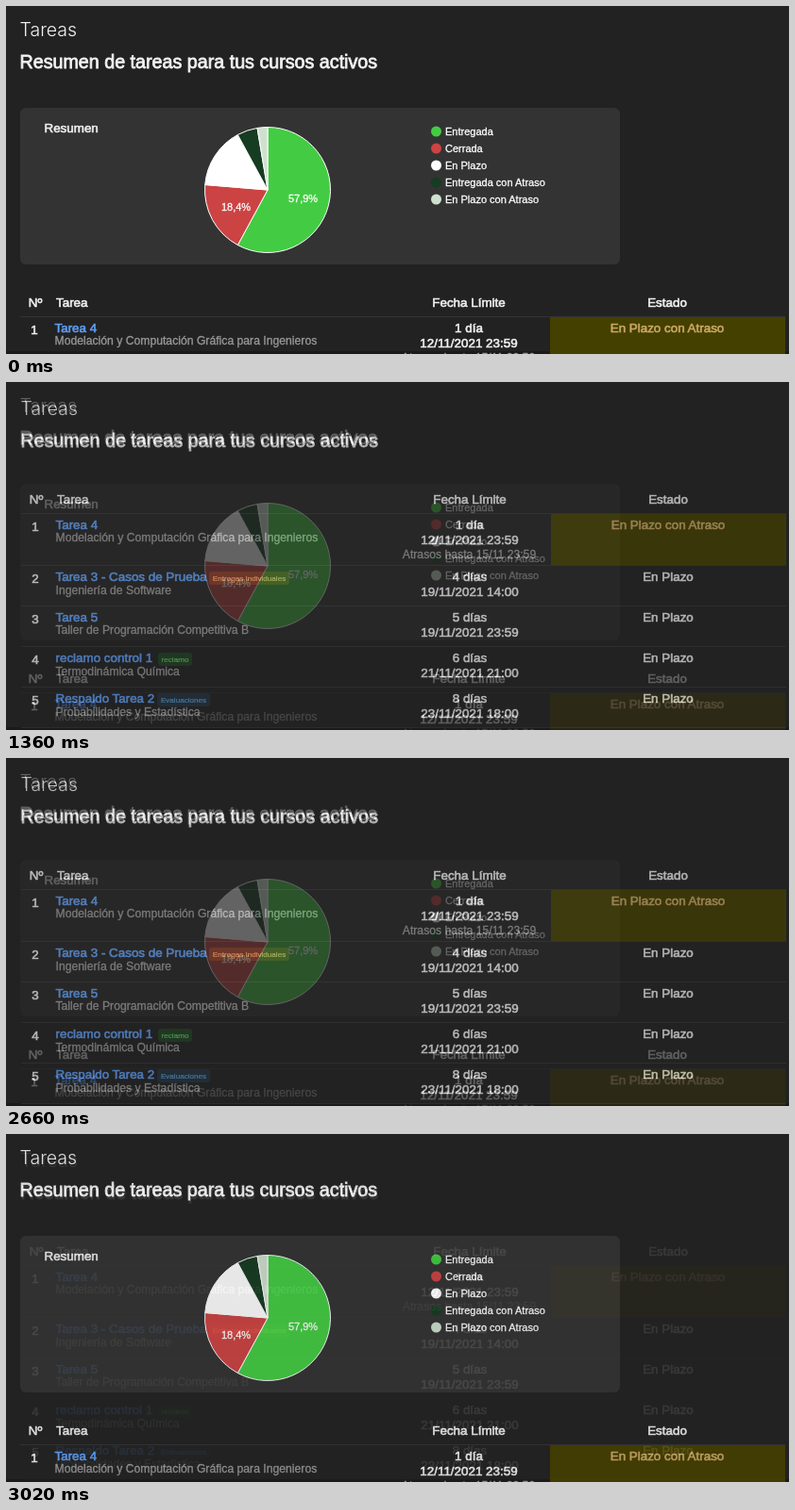
Animation of 829x369 px, one loop 3080 ms. Source, as an HTML page:

```html
<!DOCTYPE html>
<html lang="es">
<head>
<meta charset="utf-8">
<title>Tareas</title>
<style>
  html, body { margin: 0; width: 100%; height: 100%; overflow: hidden; background: #222; }
  svg { display: block; }
  /* A thin outline in the text colour gives the medium weight. */
  text {
    font-family: "Liberation Sans", Arial, sans-serif;
    color: #f2f2f2; fill: currentColor; stroke: currentColor; stroke-width: 0;
  }
  .title { font: 300 19.5px Inter, sans-serif; }
  .heading { font-size: 19.7px; stroke-width: .8px; }
  .strong { font-size: 13.4px; stroke-width: .6px; }
  .link { color: #5f9ff8; }
  .late { color: #cda865; }
  .sub { font-size: 12.2px; color: #999; stroke-width: .3px; }
  .badge { font-size: 8.1px; stroke-width: .2px; }
  .chart { font-size: 11px; color: #fff; stroke-width: .3px; }
  .mid { text-anchor: middle; }
</style>
</head>
<body>
<svg id="stage" width="829" height="369" viewBox="0 0 829 369"></svg>
<script>
const rows = [
  { y: 329, n: 1, task: "Tarea 4", course: "Modelación y Computación Gráfica para Ingenieros",
    left: "1 día", due: "12/11/2021 23:59", late: "Atrasos hasta 15/11 23:59" },
  { y: 384, n: 2, task: "Tarea 3 - Casos de Prueba", course: "Ingeniería de Software",
    left: "4 días", due: "19/11/2021 14:00",
    badge: { text: "Entregas Individuales", x: 214, w: 85, bg: "#44341f", fg: "#d6a568" } },
  { y: 427, n: 3, task: "Tarea 5", course: "Taller de Programación Competitiva B",
    left: "5 días", due: "19/11/2021 23:59" },
  { y: 470, n: 4, task: "reclamo control 1", course: "Termodinámica Química",
    left: "6 días", due: "21/11/2021 21:00",
    badge: { text: "reclamo", x: 160, w: 36, bg: "#213f24", fg: "#5fc464" } },
  { y: 513, n: 5, task: "Respaldo Tarea 2", course: "Probabilidades y Estadística",
    left: "8 días", due: "23/11/2021 18:00",
    badge: { text: "Evaluaciones", x: 159, w: 56, bg: "#23323f", fg: "#5a9bd0" } },
];
const slices = [
  ["Entregada", 22, "#43cc43"],
  ["Cerrada", 7, "#cc4343"],
  ["En Plazo", 6, "#ffffff"],
  ["Entregada con Atraso", 2, "#163c22"],
  ["En Plazo con Atraso", 1, "#cfe0cf"],
];

const text = (x, y, cls, s, attrs = "") => `<text x="${x}" y="${y}" class="${cls}" ${attrs}>${s}</text>`;
const rect = (x, y, w, h, fill, rx = 0) =>
  `<rect x="${x}" y="${y}" width="${w}" height="${h}" fill="${fill}" rx="${rx}"/>`;
const shift = (x, y, body) => `<g transform="translate(${x} ${y})">${body}</g>`;

const headings = text(14.5, 32, "title", "Tareas") +
  text(14.5, 66, "heading", "Resumen de tareas para tus cursos activos");

function badge({ text: label, x, w, bg, fg }, y) {
  return rect(x, y + 7, w, 14, bg, 3) +
    text(x + w / 2, y + 16.5, "badge mid", label, `style="color:${fg}"`);
}

function row(r) {
  const { y } = r;
  return (r.late ? rect(576, y, 249, 55, "#444000") : "") +
    rect(15, y, 810, 1, "#343434") +
    text(30, y + 19, "strong mid", r.n) +
    text(51.5, y + 17, "strong link", r.task) +
    text(51.5, y + (r.badge ? 31 : 30), "sub", r.course) +
    (r.badge ? badge(r.badge, y) : "") +
    text(490, y + 17, "strong mid", r.left) +
    text(490, y + 33, "strong mid", r.due) +
    (r.late ? text(489.5, y + 48, "sub mid", r.late) : "") +
    text(700, y + 17, r.late ? "strong late mid" : "strong mid", r.late ? "En Plazo con Atraso" : "En Plazo");
}

const table = text(31, 319, "strong mid", "Nº") + text(53, 319, "strong", "Tarea") +
  text(490, 319, "strong mid", "Fecha Límite") + text(700, 319, "strong mid", "Estado") +
  rows.map(row).join("") + rect(15, 556, 810, 1, "#343434");

function pie(cx, cy, radius) {
  const total = slices.reduce((sum, s) => sum + s[1], 0);
  const point = part => {
    const a = part / total * 2 * Math.PI;
    return `${cx + radius * Math.sin(a)} ${cy - radius * Math.cos(a)}`;
  };
  let start = 0;
  return slices.map(([, size, color]) => {
    const from = point(start), to = point(start += size);
    const large = size > total / 2 ? 1 : 0;
    return `<path d="M${cx} ${cy}L${from}A${radius} ${radius} 0 ${large} 1 ${to}Z" fill="${color}" stroke="#fff"/>`;
  }).join("");
}

const legend = slices.map(([name, , color], i) =>
  `<circle cx="455.5" cy="${133 + 18 * i}" r="5.5" fill="${color}"/>` +
  text(465, 137 + 18 * i, "chart", name)).join("");

const summary = rect(15, 108, 635, 166, "#333", 6) + text(40.5, 134, "strong", "Resumen") +
  pie(277, 195, 66.5) + text(314.5, 208, "chart mid", "57,9%") +
  text(243.5, 217, "chart mid", "18,4%") + legend;

const backdrop = rect(0, 0, 829, 369, "#222") + rect(0, 366, 829, 3, "#1d191b");
document.getElementById("stage").innerHTML =
  backdrop + headings + summary + table +
  `<g id="list">${backdrop}${shift(1, 3, headings)}${shift(1, -190, table)}</g>`;

const list = document.getElementById("list");
const LOOP = 3080, HOLD = 1000, FADE = 540, STEP = 60;

// Each half of the loop holds one view, then crossfades in tenths.
function listOpacity(t) {
  const half = HOLD + FADE;
  const local = t % half;
  const mix = local < HOLD ? 0 : (Math.floor((local - HOLD) / STEP) + 1) / 10;
  return t < half ? mix : 1 - mix;
}

let origin = null;
function draw(now) {
  origin ??= now;
  list.setAttribute("opacity", listOpacity((now - origin) % LOOP));
  requestAnimationFrame(draw);
}
list.setAttribute("opacity", 0);
requestAnimationFrame(draw);
</script>
</body>
</html>
```
